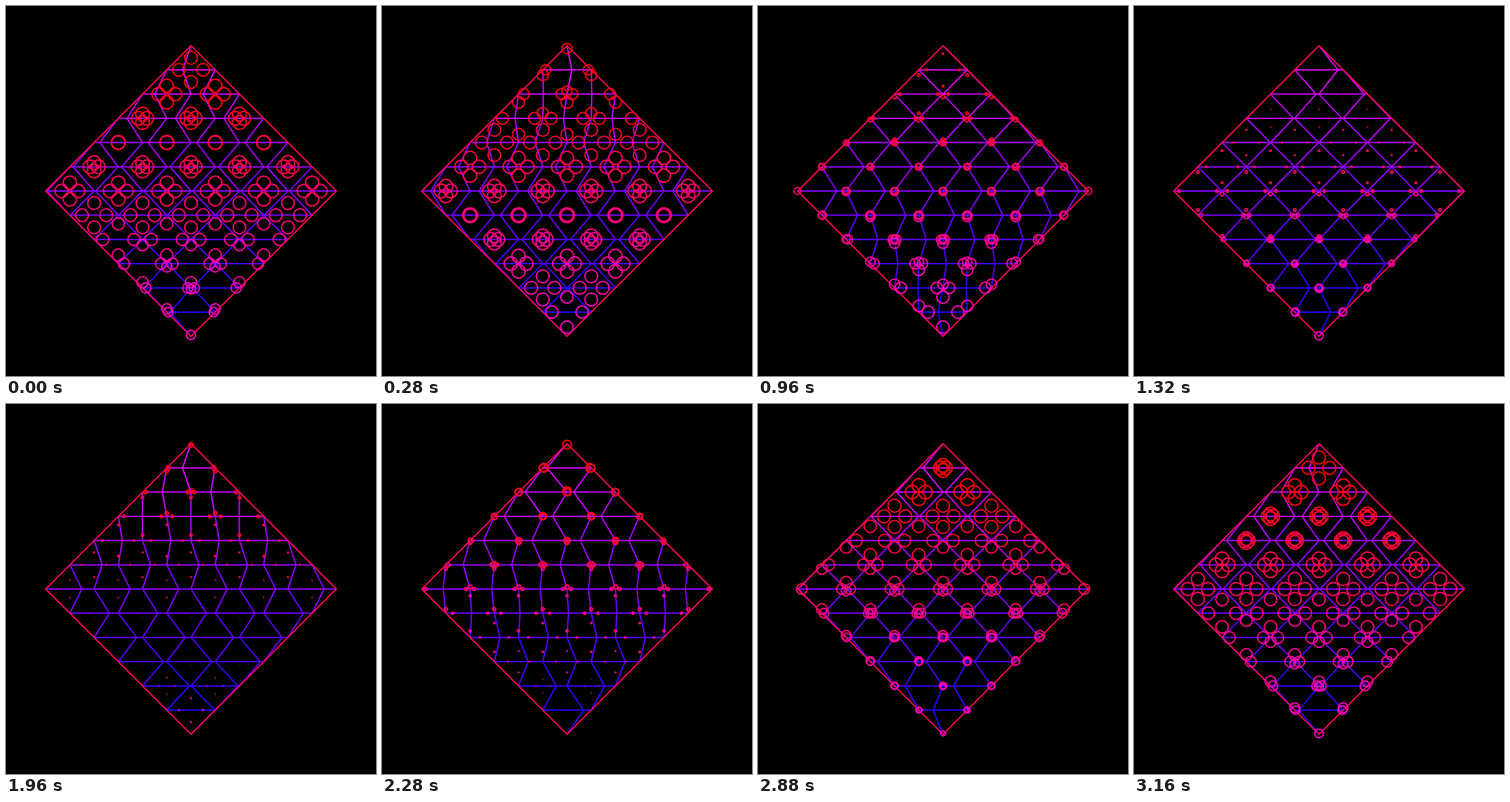
Recreate the animation shown at these times as an HTML page with a canvas. Size 540 by 540 pixels, loop 3.2 s.

```html
<!DOCTYPE html>
<html>
<head>
<meta charset="utf-8">
<style>
html, body { margin: 0; height: 100%; overflow: hidden; background: #000; }
canvas { display: block; }
</style>
</head>
<body>
<canvas id="stage" width="540" height="540"></canvas>
<script>
const ctx = document.getElementById('stage').getContext('2d');
const LOOP = 3200, STEP = 40, N = 6, MID = 270;
const H = 25 * Math.SQRT2; // half diagonal of a cell
const rad = deg => deg * Math.PI / 180;

function path(color, ...points) {
  ctx.strokeStyle = color;
  ctx.beginPath();
  for (const [x, y] of points) ctx.lineTo(x, y);
  ctx.stroke();
}

function circle(x, y, r) {
  ctx.beginPath();
  ctx.arc(x, y, r, 0, 2 * Math.PI);
  ctx.stroke();
}

function eachCell(draw) {
  for (let i = 0; i < N; i++)
    for (let j = 0; j < N; j++) {
      const row = i + j;
      draw(MID + (i - j) * H, MID + (row + 1 - N) * H, row);
    }
}

function render(time) {
  const turn = 360 * time / LOOP;
  const phase = row => 10 * row - 30 - turn;
  ctx.fillStyle = '#000';
  ctx.fillRect(0, 0, 540, 540);
  ctx.lineWidth = 2;

  eachCell((x, y, row) => {
    const color = `rgb(${225 - 19 * row},0,255)`;
    const bend = x - H * Math.sin(rad(phase(row) + 50));
    path(color, [x - H, y], [x + H, y]);
    path(color, [x, y - H], [bend, y], [x, y + H]);
  });

  const R = N * H;
  path('#ff0055', [MID, MID - R], [MID + R, MID], [MID, MID + R], [MID - R, MID], [MID, MID - R]);

  eachCell((x, y, row) => {
    const a = rad(phase(row));
    const d = H * Math.sin(a), r = 5 * (1 + Math.cos(a));
    ctx.strokeStyle = `rgb(255,0,${20 * row})`;
    for (const [dx, dy] of [[d, 0], [-d, 0], [0, d], [0, -d]]) circle(x + dx, y + dy, r);
  });
}

const start = performance.now();
function tick() {
  const time = (performance.now() - start) % LOOP;
  render(Math.floor(time / STEP) * STEP);
  requestAnimationFrame(tick);
}
tick();
</script>
</body>
</html>
```
